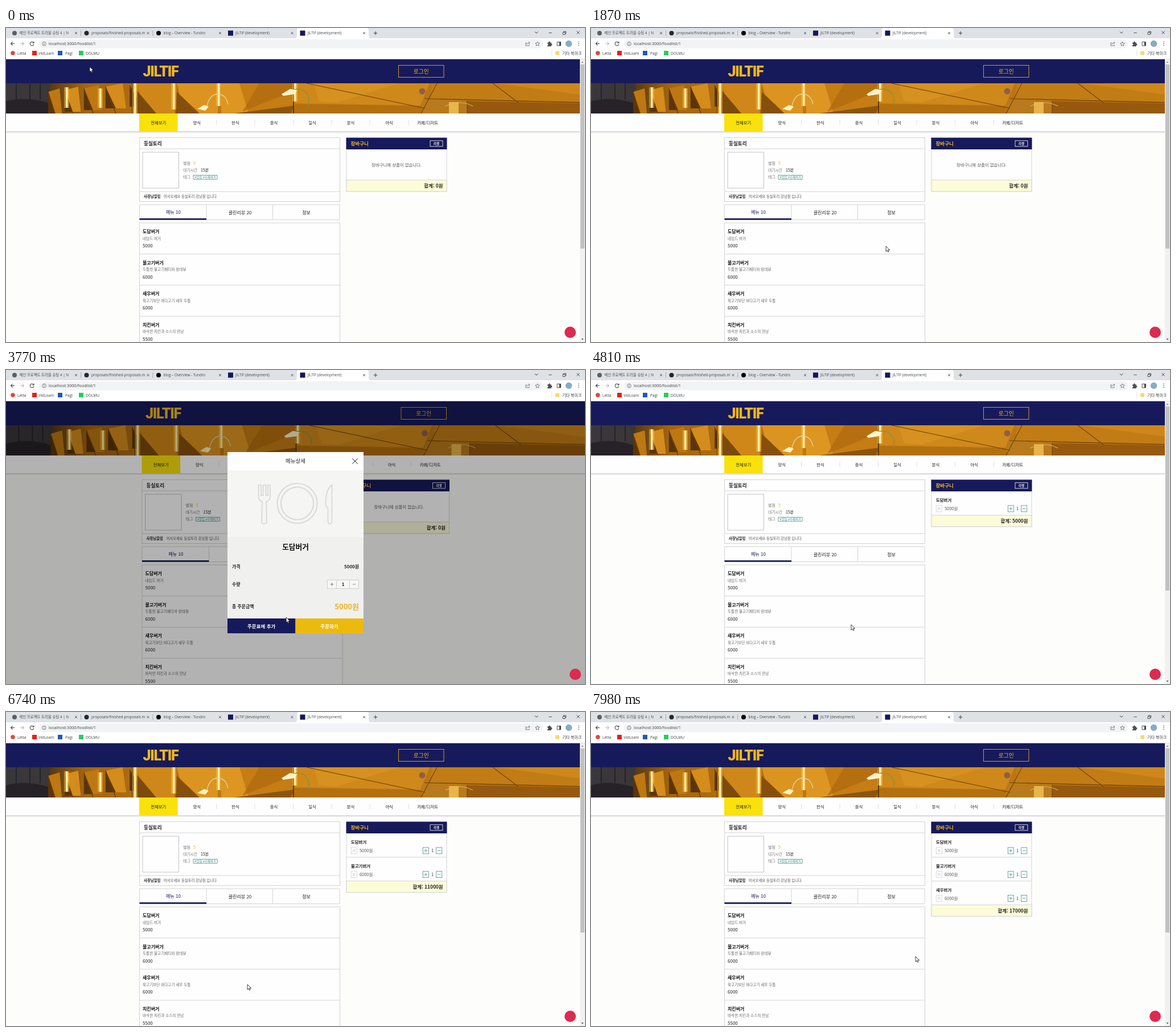
Recreate the animation shown at these times as an HTML page. Size 1017x551 px, loop 8 s.

```html
<!DOCTYPE html>
<html lang="ko">
<head>
<meta charset="utf-8">
<title>Food order</title>
<style>
html, body { margin: 0; width: 100%; height: 100%; overflow: hidden; background: #fdfdfc; }
svg { position: fixed; left: 0; top: 0; display: block; }
text { font-family: "Noto Sans CJK KR", "Noto Sans CJK JP", sans-serif; white-space: pre; }
.ui { font-family: "Open Sans", "Noto Sans CJK KR", "Noto Sans CJK JP", sans-serif; }
.logo { font-family: Roboto, sans-serif; font-weight: 900; letter-spacing: -1.3px; }
.b { font-weight: 700; }
.mid { text-anchor: middle; }
.end { text-anchor: end; }
</style>
</head>
<body>
<svg id="stage" width="1017" height="551" viewBox="0 0 1017 551"></svg>
<script>
const LOOP = 8000;
const NAVY = '#171a5a', GOLD = '#f0b31c', LINE = '#d3d3d8', TEAL = '#3d9486';
const MENU = [
  ['도담버거', '네임드 버거', 5000],
  ['불고기버거', '두툼한 불고기패티와 랑데뷰', 6000],
  ['새우버거', '육고기보단 바다고기 새우 두툼', 6000],
  ['치킨버거', '바삭한 치킨과 소스의 만남', 5500]
];
// Times at which each dish dialog opens and closes
const DIALOGS = [[2870, 4810], [5680, 6500], [6880, 7390]];
const POINTER = [
  [0, 147, 68], [40, 147, 68], [450, 520, 215], [850, 820, 360], [1070, 719, 236],
  [1270, 719, 236], [1870, 519, 383], [2090, 323, 361], [2240, 278, 369],
  [3170, 278, 369], [3770, 492, 434], [3990, 518, 447], [4140, 547, 454],
  [4310, 547, 454], [4410, 457, 447], [4810, 457, 447], [5010, 440, 430],
  [5180, 440, 430], [5510, 412, 424], [5760, 412, 424], [6180, 428, 454],
  [6500, 428, 454], [6700, 424, 478], [6900, 424, 478], [7240, 436, 447],
  [7400, 436, 447], [7980, 570, 429], [8000, 570, 429]
];

const text = (x, y, s, size, fill = '#222', cls = '') =>
  `<text x="${x}" y="${y}" font-size="${size}" fill="${fill}" class="${cls}">${s}</text>`;
const box = (x, y, w, h, fill = 'none', stroke = 'none', extra = '') =>
  `<rect x="${x}" y="${y}" width="${w}" height="${h}" fill="${fill}" stroke="${stroke}" ${extra}/>`;
const path = (d, stroke, width = 1, fill = 'none') =>
  `<path d="${d}" stroke="${stroke}" stroke-width="${width}" fill="${fill}"/>`;
const shape = (d, fill, opacity = 1) => `<path d="${d}" fill="${fill}" opacity="${opacity}"/>`;
const dot = (x, y, r, fill) => `<circle cx="${x}" cy="${y}" r="${r}" fill="${fill}"/>`;
const cross = (x, y, r, color, width = .8) =>
  path(`M${x - r} ${y - r}l${2 * r} ${2 * r}m0 ${-2 * r}l${-2 * r} ${2 * r}`, color, width);
const plus = (x, y, r, color, width = .8) => path(`M${x - r} ${y}h${2 * r}M${x} ${y - r}v${2 * r}`, color, width);
const minus = (x, y, r, color, width = .8) => path(`M${x - r} ${y}h${2 * r}`, color, width);

function browser() {
  const ink = '#5f6368';
  const tabs = ['메인 프로젝트 트러블 슈팅 4 | N', 'proposals/finished-proposals.m', 'blog – Overview - Tundro',
    'JILTIF (development)', 'JILTIF (development)'];
  let s = box(0, 0, 1017, 18, '#dee1e6') + box(0, 18, 1017, 36.5, '#fff') +
    shape('M507 18q4 0 4-4V4q0-4 4-4h118q4 0 4 4v10q0 4 4 4z', '#fff');
  tabs.forEach((label, i) => {
    const x = 15 + i * 126.5;
    s += i < 3 ? dot(x, 9, 4, ['#5b5e63', '#24292f', '#000'][i]) : box(x - 4.5, 4.5, 9, 9, '#14175a');
    s += text(x + 8.5, 11.3, label, 6.4, '#45494d', 'ui') + cross(x + 108, 9, 2, '#3c4043');
    if (i < 2) s += box(x + 116, 4, .7, 10, '#94989d');
  });
  s += plus(649, 9, 3.2, '#3c4043', 1) + path('M929 6.5l2.7 2.7 2.7-2.7', '#333') + minus(956, 8.5, 2.7, '#333') +
    path('M978 7.5h4v4h-4zM979.5 7.5V6h4v4H982', '#333', .8) + cross(1005, 8, 2.6, '#333');
  s += path('M15 27.5H8.5m3-3l-3 3 3 3', '#43474b', 1.1) + path('M25 27.5h6.5m-3-3l3 3-3 3', '#babcbe', 1.1) +
    path('M48.3 25.5a3.4 3.4 0 1 0 .6 3M49 23.7v2.6h-2.6', '#43474b', 1.1);
  s += box(58, 20, 885, 15.5, '#f1f3f4', 'none', 'rx="7.7"') +
    `<circle cx="67" cy="27.7" r="3.3" fill="none" stroke="${ink}" stroke-width=".8"/>` +
    path('M67 27v2.4M67 25.4v.9', ink, .8) + text(75, 30.3, 'localhost:3000/foodlist/1', 7.2, '#3c4043', 'ui');
  s += path('M915 26h-2v5h6v-2M915 29q0-3 5-3m-2-2l2 2-2 2', ink, .8) +
    path('M933.5 24l1.1 2.5 2.7.2-2 1.9.6 2.6-2.4-1.4-2.4 1.4.6-2.6-2-1.9 2.7-.2z', ink, .8) +
    shape('M951 25.5h2q0-2 1.4-2t1.4 2h2v2q1.6 0 1.6 1.4t-1.6 1.4v1.9h-6.8v-2q1.5 0 1.5-1.3t-1.5-1.3z', '#4a4d51') +
    path('M968 24.5h6.5v6.5H968z', '#4a4d51') + box(971.7, 24.5, 3, 6.5, '#4a4d51') +
    dot(988.5, 27.5, 5.7, '#86acc4') + [24.5, 27.5, 30.5].map(y => dot(1006, y, .8, '#4a4d51')).join('');
  s += dot(12, 44, 3.8, '#dc4a3e') + text(20, 46.6, 'Letta', 6.6, '#3c4043', 'ui');
  [[46, 57.5, '#e8201b', 'VidLoam'], [91, 104, '#2359b5', 'Pagi'], [128, 140, '#25cf5c', 'DOLMU']].forEach(([x, tx, c, n]) => {
    s += box(x, 40, 8, 8, c) + text(tx, 46.6, n, 6.6, '#3c4043', 'ui');
  });
  s += box(958.5, 39, .7, 10, '#d5d7da') + box(965, 40.5, 7, 7, '#f6d873', 'none', 'rx="1"') +
    text(977, 46.6, '기타 북마크', 7, '#3c4043');
  return s;
}

function photo() {
  let s = box(-6, 97, 1030, 53, 'url(#amber)') + shape('M-6 97h84l-4 53h-80z', '#38363d', .85) +
    shape('M-6 130q40-12 82 2v18H-6z', '#262228') + path('M18 97v34M42 97v30M60 97v28', '#24242c', 2);
  // Receding canvas panels, wider towards the viewer
  for (let i = 0; i < 5; i++) {
    const x = 74 + i * 27 + i * i * 2.2, w = 27 + i * 4.4;
    s += shape(`M${x} ${112 - i * 3}l${w * .8} 38H${x}z`, '#5b340a') +
      shape(`M${x} ${112 - i * 3}l${w * .75} -6l${w * .15} 44h${-w * .45}z`, i % 2 ? '#d48c1c' : '#bd7813') +
      path(`M${x} ${112 - i * 3}l${w * .45} ${38 + i * 3}`, '#6b3e08', 1.4);
  }
  s += shape('M230 97h66v53h-52z', '#cf8719') + shape('M230 110l34 40h-36z', '#7c4a0b') +
    shape('M300 97h72v53h-58z', '#db9420') + shape('M300 112l40 38h-42z', '#86500c') +
    shape('M378 97h127v38l-60 15h-67z', '#c57d14') + shape('M378 97h32l16 53h-48z', '#dd9621') +
    shape('M445 97h60v14l-90 36z', '#b06a0f', .7) + shape('M400 150l108-14 70 14z', '#8d550c') +
    shape('M508 97h236l-16 39-220-4z', '#cf881a') + shape('M540 97h150l-110 34-30-2z', '#dc9825', .6) +
    shape('M508 133l222 4-3 13H500z', '#b3700f') + shape('M748 97h276v34l-278-6z', '#c27c15') +
    shape('M860 97h164v22z', '#d18a1c', .8) + shape('M738 127l286 6v17H728z', '#96590d') +
    shape('M732 125h78v25h-80z', '#b87a1c') + shape('M778 130h17v20h-17z', '#e8b54a') +
    path('M528 97l208 44M735 124l289 7M757 97l-28 53M810 128v22M855 97l45 34', '#6d420a', 1.1) +
    path('M505 97v53M222 97v53', '#5d390c', 2);
  [[105, 104, 36], [164, 106, 34], [225, 97, 53], [293, 97, 46], [372, 97, 40], [506, 97, 32]].forEach(([x, y, h]) => {
    s += box(x - 3, y, 9, h, '#ffc440', 'none', 'opacity=".5"') + box(x, y, 3.5, h, '#ffedaa');
  });
  s += path('M352 142q4-26 20-26 14 0 18 18', '#e2d29a', 1.3) + path('M505 108q22-4 27 16v12', '#879345', 1.5) +
    path('M772 137q25-12 48 0', '#d9bb68', 1.2) + shape('M484 116l15-9 12 2-4 7-20 3z', '#fff3ca') +
    shape('M336 142l12-7 8 3-6 7z', '#fff0bd') + dot(731, 111, 5.5, '#8d6049');
  return `<g clip-path="url(#band)">${s}</g>`;
}

function shop() {
  let s = box(-6, 54.5, 1030, 42.5, NAVY) + text(240.5, 85, 'JILTIF', 25, '#f5b81b', 'logo') +
    box(689.5, 65.5, 79.5, 21, 'none', GOLD, 'stroke-width=".85"') + text(729.3, 79.6, '로그인', 9.8, GOLD, 'mid') + photo();
  s += box(-6, 150, 1030, 32, '#fefefe') + box(-6, 181.5, 1030, 1, '#b9b9b9') + box(-6, 182.5, 1030, 1.2, '#e6e6e6') +
    box(234, 150, 67.6, 31.8, '#f9e10c');
  ['전체보기', '양식', '한식', '중식', '일식', '분식', '야식', '카페/디저트'].forEach((label, i) => {
    s += text(267.8 + i * 67.55, 169.4, label, 7.4, '#222', 'mid');
    if (i > 1) s += box(234 + i * 67.55, 161, .7, 9, LINE);
  });
  s += box(234.5, 192.5, 352, 112, '#fefefe', LINE) + path('M234.5 212h352M234.5 287h352', LINE) +
    text(242, 206, '둥실토리', 8.6, '#222', 'b') + box(240, 218, 63.5, 63, '#fefefe', '#c3c3ca') +
    text(311, 240, '별점', 7, '#777') + text(329, 240, '5', 7.2, GOLD) +
    text(311, 252.2, '대기시간', 6.8, '#777') + text(342, 252.2, '15분', 7, '#222') +
    text(311, 264.2, '태그', 7, '#777') + box(329, 258.3, 42, 7, 'none', TEAL, 'stroke-width=".8"') +
    text(331.5, 263.8, '#맛집 #수제버거', 5.4, TEAL) +
    text(242, 298.2, '사장님알림', 6.4, '#222', 'b') + text(277, 298.2, '어서오세요 둥실토리 강남점 입니다', 6.35, '#555');
  s += box(234.5, 310, 351.5, 26.5, '#fefefe', LINE) + path('M352 310v26.5M468.5 310v26.5', LINE) +
    box(234.5, 334, 117.5, 2.7, NAVY) + text(294, 325.8, '메뉴 10', 8.1, NAVY, 'mid') +
    text(411, 326.8, '클린리뷰 20', 8, '#222', 'mid') + text(527.5, 326.8, '정보', 8, '#222', 'mid');
  s += box(234.5, 342, 352, 240, '#fefefe', LINE);
  MENU.forEach(([name, note, price], i) => {
    const y = 342 + i * 54.6;
    if (i) s += path(`M234.5 ${y}h352`, LINE);
    s += text(240, y + 18, name, 8, '#111', 'b') + text(240, y + 29.5, note, 6.6, '#666') + text(240, y + 43, price, 8);
  });
  return s;
}

function cart(count) {
  const rows = MENU.slice(0, count), h = count ? count * 41.8 : 53.8, bottom = 213 + h;
  const total = rows.reduce((sum, r) => sum + r[2], 0);
  const thin = 'stroke-width=".8"';
  let s = box(598, 193, 176, h + 40, '#fefefe', LINE) + box(597.5, 192.5, 177, 20.5, NAVY) +
    text(605.5, 206, '장바구니', 8.5, '#f5b81b', 'b') + box(745, 197.8, 22, 10, 'none', '#fff', thin) +
    text(756, 204.8, '리셋', 5.4, '#fff', 'b mid');
  if (!count) s += text(686, 243, '장바구니에 상품이 없습니다.', 7.4, '#555', 'mid');
  rows.forEach(([name, , price], i) => {
    const y = 213 + i * 41.8;
    if (i) s += path(`M598 ${y}h176`, LINE);
    s += text(606, y + 18, name, 7.4, '#222', 'b') + box(606.3, y + 24.8, 10, 11, 'none', '#d0d0d0', thin) +
      cross(611.3, y + 30.3, 2.4, '#b5b5b5') + text(621, y + 33, price + '원', 7.4, '#555') +
      box(732.3, y + 24.8, 10, 11, 'none', TEAL, thin) + plus(737.3, y + 30.3, 2.9, TEAL) +
      text(749, y + 33, '1', 7.4, '#333', 'mid') + box(755.7, y + 24.8, 10, 11, 'none', TEAL, thin) +
      minus(760.7, y + 30.3, 2.9, TEAL);
  });
  return s + box(598, bottom, 176, 20, '#fcfcd9', LINE) + text(767.5, bottom + 13.4, `합계: ${total}원`, 8.4, '#222', 'b end');
}

function dialog([name, , price]) {
  const pale = '#dbdbd9';
  const ring = r => `<circle cx="511.5" cy="234" r="${r}" fill="none" stroke="${pale}" stroke-width="2.2"/>`;
  return box(389, 144, 239, 318, '#f0f0ef') + box(389, 144, 239, 32, '#fefefe') + box(389, 176, 239, 117, '#f5f5f3') +
    text(508.5, 163.3, '메뉴상세', 9.5, '#222', 'mid') + cross(613, 160, 4.8, '#222', 1) + ring(35) + ring(28.5) +
    path('M443.5 202v20q0 7 6.5 9l-1 35q0 4 4.5 4t4.5-4l-1-35q7-2 7-9v-20h-4v18h-3.5v-18h-5v18H448v-18z', pale, 2) +
    path('M572.5 202v63q0 5-3.5 5t-3.5-5v-23q-4-1-4-7 0-27 11-33z', pale, 2) +
    text(508.5, 314.5, name, 12.7, '#111', 'b mid') + text(397, 348, '가격', 7.9, '#222', 'b') +
    text(620, 348, price + '원', 7.9, '#222', 'b end') + text(397, 379.2, '수량', 7.9, '#222', 'b') +
    box(564.5, 368.5, 55, 15, '#f7f7f6', '#cfcfcf') + path('M580.5 368.5v15M603.5 368.5v15', '#cfcfcf') +
    plus(572.5, 376, 2.6, '#555') + text(592, 379, '1', 8, '#222', 'b mid') + minus(611.5, 376, 2.6, '#777') +
    text(397, 418, '총 주문금액', 7.9, '#222', 'b') + text(620, 419.7, price + '원', 13, GOLD, 'b end') +
    box(389, 436, 119.5, 26, NAVY) + box(508.5, 436, 119.5, 26, '#ecba0d') +
    text(448.7, 452.6, '주문표에 추가', 8.5, '#fff', 'b mid') + text(568, 452.6, '주문하기', 8.5, '#fff', 'b mid');
}

const scrollbar = box(1008, 54.5, 9, 497, '#f1f1f1') + box(1009, 64, 7, 323, '#c1c1c1') +
  shape('M1010.5 61l2-2.5 2 2.5z', '#888') + shape('M1010.5 545l2 2.5 2-2.5z', '#505050');

document.getElementById('stage').innerHTML = `
<defs>
  <linearGradient id="amber">
    <stop offset="0" stop-color="#484446"/><stop offset=".08" stop-color="#553915"/>
    <stop offset=".14" stop-color="#a3650e"/><stop offset=".45" stop-color="#c67f14"/>
    <stop offset="1" stop-color="#b06c0f"/>
  </linearGradient>
  <clipPath id="band">${box(-6, 97, 1030, 53)}</clipPath>
</defs>
${box(0, 0, 1017, 551, '#fdfdfc')}
<g id="page">${shop()}<g id="cart"></g></g>
<g id="scroll">${scrollbar}</g>
<g id="veil">${box(0, 54.5, 1017, 497, '#000', 'none', 'opacity=".3"')}<g id="dialog"></g></g>
<g id="badge">${dot(0, 0, 10, '#dc2b50')}</g>
${browser()}
<g id="pointer">${path('M0 0v9.2l2.1-2 1.4 3.1 1.6-.7-1.4-3.1h2.9z', '#111', .8, '#fff')}</g>`;

const el = id => document.getElementById(id);
const show = (id, on) => el(id).setAttribute('visibility', on ? 'visible' : 'hidden');
const move = (id, x, y) => el(id).setAttribute('transform', `translate(${x} ${y})`);
let shown = '';

function pointerAt(t) {
  const i = POINTER.findIndex(p => p[0] > t);
  const [t0, x0, y0] = POINTER[i - 1], [t1, x1, y1] = POINTER[i];
  const k = (t - t0) / (t1 - t0);
  return [x0 + (x1 - x0) * k, y0 + (y1 - y0) * k];
}

function draw(t) {
  const open = DIALOGS.findIndex(([a, b]) => t >= a && t < b);
  const count = DIALOGS.filter(d => t >= d[1]).length;
  const state = open + '/' + count;
  if (state !== shown) {
    shown = state;
    const modal = open >= 0;
    el('cart').innerHTML = cart(count);
    el('dialog').innerHTML = modal ? dialog(MENU[open]) : '';
    show('veil', modal);
    show('scroll', !modal);
    // Content recentres when the scrollbar goes away
    move('page', modal ? 4.5 : 0, 0);
    move('badge', modal ? 1000 : 991, 534);
  }
  move('pointer', ...pointerAt(t));
}

function tick() {
  draw(performance.now() % LOOP);
  requestAnimationFrame(tick);
}
tick();
</script>
</body>
</html>
```
